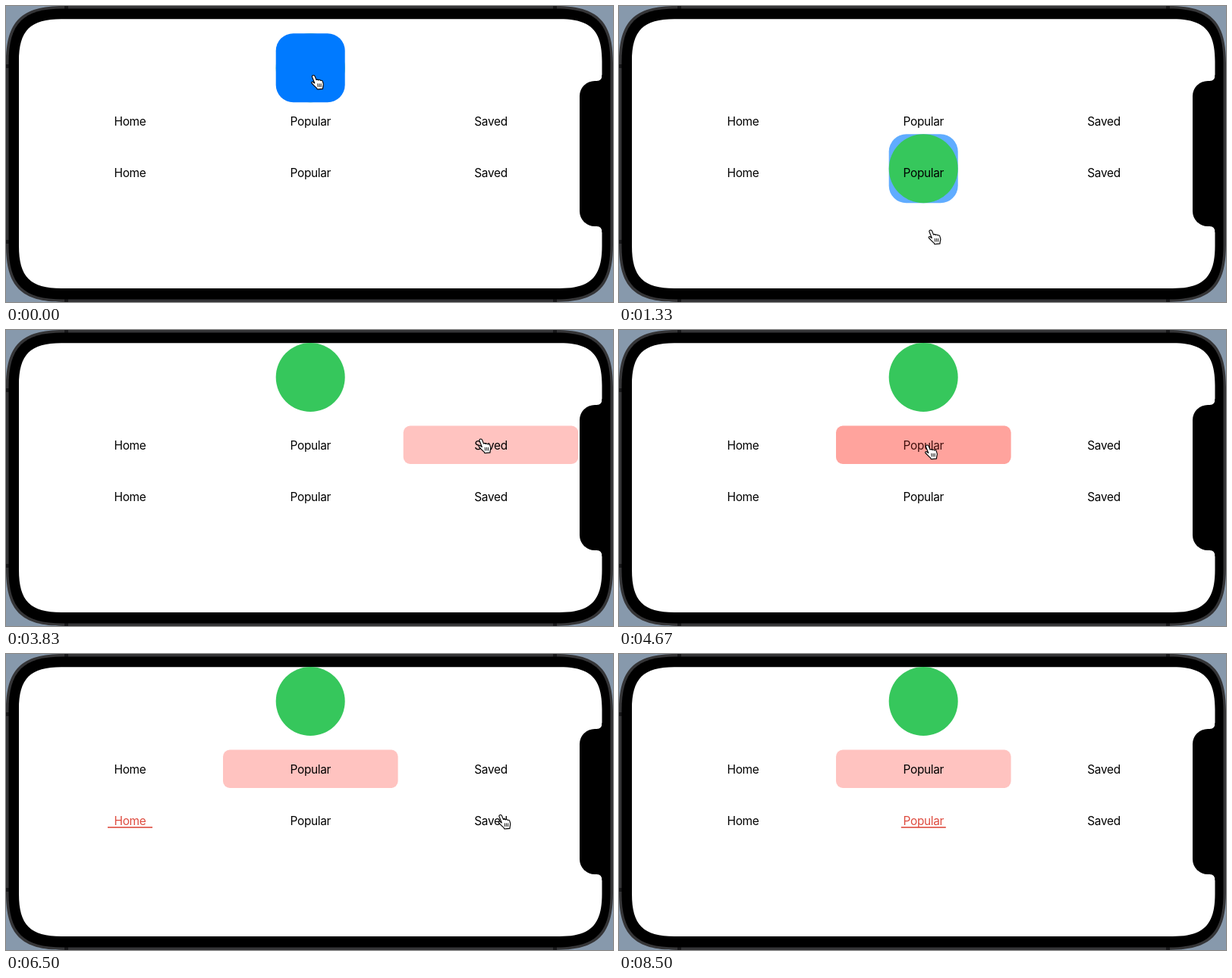
Recreate the animation shown at these times as an HTML page. Size 800 by 391 pixels, loop 9830 ms.

```html
<!DOCTYPE html>
<html lang="en">
<head>
<meta charset="utf-8">
<title>Matched geometry demo</title>
<style>
  html, body { margin: 0; width: 100%; height: 100%; overflow: hidden; background: #8799ac; }
  svg { display: block; width: 100vw; height: 100vh; }
  text {
    font: 400 15.4px Inter, Roboto, sans-serif;
    letter-spacing: -0.3px;
    text-anchor: middle;
  }
  .pill { fill: #ff3b30; fill-opacity: 0.3; }
  .line { fill: #de4b3f; }
</style>
</head>
<body>
<svg id="stage" viewBox="0 0 800 391">
  <defs>
    <path id="palm" d="M2.6.6C3.8.1 4.8.8 5.2 2L7 6.6C7.8 5.9 9.3 6 9.8 7C10.7 6.2 12.2 6.5 12.6 7.5C13.7 7 15 7.5 15.4 8.7C16.6 11.5 16.6 13.4 15.8 15.2L15.4 18.4L8.2 19L7.6 17.4C5.2 15.8 3 13 1 11C0 9.9 1 8.7 2.4 9.2L4.8 11L1.5 2.8C1.1 1.8 1.5.9 2.6.6Z"/>
  </defs>
  <path id="body" fill="#353537"/>
  <path d="M77 0h5v4h-5z M721 0h5v4h-5z M77 387h5v4h-5z M721 387h5v4h-5z M0 77h4v5h-4z M0 309h4v5h-4z" fill="#18181a"/>
  <path id="bezel"/>
  <path id="screen" fill="#fff"/>
  <path d="M785.5 91q0 8-7 8h-2.5a20 20 0 0 0-20 20v152a20 20 0 0 0 20 20h2.5q7 0 7 8h3V91z"/>
  <g id="shapes">
    <rect id="square" x="355.7" width="91" height="91" rx="23" fill="#007aff"/>
    <circle id="disc" cx="401.2" r="45.5" fill="#36c75c"/>
  </g>
  <g id="tabs"></g>
  <g id="hand" stroke-linejoin="round" stroke-linecap="round">
    <use href="#palm" x=".7" y="1.2" opacity=".22"/>
    <use href="#palm" fill="#fff" stroke="#000" stroke-width="1.1"/>
    <path d="M8.8 11.8l.3 3.8M11 11.8l.2 3.8M13.2 11.8v3.8" fill="none" stroke="#000" stroke-width=".9"/>
  </g>
</svg>
<script>
const LOOP = 9830, FPS = 6, MOVE = 350;
const TOP = 17, BOTTOM = 262;
const LABELS = ['Home', 'Popular', 'Saved'];
const CENTERS = [163.5, 401.3, 639];

// Taps: start time, chosen tab, optional fade start and length
const PILL_TAPS = [
  { at: 2000, to: 0 },
  { at: 3425, to: 2 },
  { at: 4316, to: 1, fadeAt: 4600, fade: 230 }
];
const LINE_TAPS = [{ at: 5140, to: 0 }, { at: 6600, to: 2 }, { at: 7640, to: 1 }];

// Pointer stops: time, x, y
const STOPS = [
  [0, 402, 91], [200, 402, 91], [900, 407.5, 295.5], [1400, 407.5, 295.5],
  [1950, 152, 150], [2510, 152, 150], [2660, 357.5, 162.5], [3170, 566, 155],
  [3380, 622.5, 143.5], [3840, 622.5, 143.5], [4300, 403, 151.5], [4840, 403, 151.5],
  [5180, 152, 223], [5700, 152, 223], [6490, 648.5, 212], [6990, 648.5, 212],
  [7250, 520, 239], [7520, 402, 220], [8050, 402, 220], [8330, 420, 130]
];
const POINTER_END = 8400;

const $ = id => document.getElementById(id);
const mix = (a, b, p) => a + (b - a) * p;
const ease = (t, start, length = MOVE) => {
  const u = Math.min(1, Math.max(0, (t - start) / length));
  return u * u * (3 - 2 * u);
};
const set = (el, attrs) => {
  for (const key in attrs) el.setAttribute(key, attrs[key]);
  return el;
};
const add = (name, attrs) =>
  $('tabs').appendChild(set(document.createElementNS('http://www.w3.org/2000/svg', name), attrs));

// Rectangle with smooth, continuous corners
function softRect(x, y, w, h, r) {
  const e = 1.3 * r, k = e - 0.348 * r;
  return `M${x + e} ${y}h${w - 2 * e}c${k} 0 ${e} ${e - k} ${e} ${e}` +
    `v${h - 2 * e}c0 ${k} ${k - e} ${e} ${-e} ${e}` +
    `h${2 * e - w}c${-k} 0 ${-e} ${k - e} ${-e} ${-e}` +
    `v${2 * e - h}c0 ${-k} ${e - k} ${-e} ${e} ${-e}z`;
}
set($('body'), { d: softRect(0, 0, 800, 391, 58) });
set($('bezel'), { d: softRect(3.5, 3.5, 793, 384, 55) });
set($('screen'), { d: softRect(17, 17.3, 768.5, 355.7, 43) });

function makeRow(baseline, mark) {
  return LABELS.map((label, i) => {
    const shape = add('rect', mark);
    const text = add('text', { x: CENTERS[i], y: baseline });
    text.textContent = label;
    return { shape, text };
  });
}
const pills = makeRow(157.6, { class: 'pill', y: 126.5, width: 230.6, height: 50.5, rx: 9 });
const lines = makeRow(225.6, { class: 'line', y: 228.2, width: 59, height: 1.6 });

function drawRow(row, taps, t, tint) {
  const alpha = [0, 0, 0];
  const glow = [0, 0, 0];
  let x = CENTERS[0], last = -1;
  for (const { at, to, fadeAt = at, fade = MOVE } of taps) {
    if (t < at) break;
    const p = ease(t, fadeAt, fade);
    alpha.fill(0);
    glow.fill(0);
    glow[to] = p;
    // A new mark is solid at once; the old one fades while both travel
    alpha[to] = last < 0 ? p : 1;
    if (last >= 0) alpha[last] = glow[last] = 1 - p;
    x = mix(CENTERS[last < 0 ? to : last], CENTERS[to], ease(t, at));
    last = to;
  }
  row.forEach(({ shape, text }, i) => {
    set(shape, { x: x - shape.getAttribute('width') / 2, opacity: alpha[i] });
    const a = glow[i];
    if (tint) set(text, { fill: `rgb(${222 * a},${75 * a},${63 * a})` });
  });
}

function drawShapes(t) {
  const rising = t >= 1187;
  const p = ease(t, rising ? 1187 : -60);
  const y = rising ? mix(BOTTOM, TOP, p) : mix(TOP, BOTTOM, p);
  set($('square'), { y, opacity: rising ? 1 - p : 1 });
  set($('disc'), { cy: y + 45.5, opacity: rising ? 1 : 1 - p });
  const front = rising ? $('disc') : $('square');
  if ($('shapes').lastElementChild !== front) $('shapes').append(front);
}

function drawPointer(t) {
  const next = STOPS.findIndex(stop => stop[0] > t);
  const b = next < 0 ? STOPS[STOPS.length - 1] : STOPS[next];
  const a = next < 0 ? b : STOPS[next - 1];
  const p = a === b ? 1 : ease(t, a[0], b[0] - a[0]);
  set($('hand'), {
    transform: `translate(${mix(a[1], b[1], p)} ${mix(a[2], b[2], p)})`,
    visibility: t < POINTER_END ? 'visible' : 'hidden'
  });
}

function draw(now) {
  const t = Math.floor((now % LOOP + 4) * FPS / 1000) * 1000 / FPS;
  drawShapes(t);
  drawRow(pills, PILL_TAPS, t, false);
  drawRow(lines, LINE_TAPS, t, true);
  drawPointer(t);
}

const start = performance.now();
function tick() {
  draw(performance.now() - start);
  requestAnimationFrame(tick);
}
tick();
</script>
</body>
</html>
```
